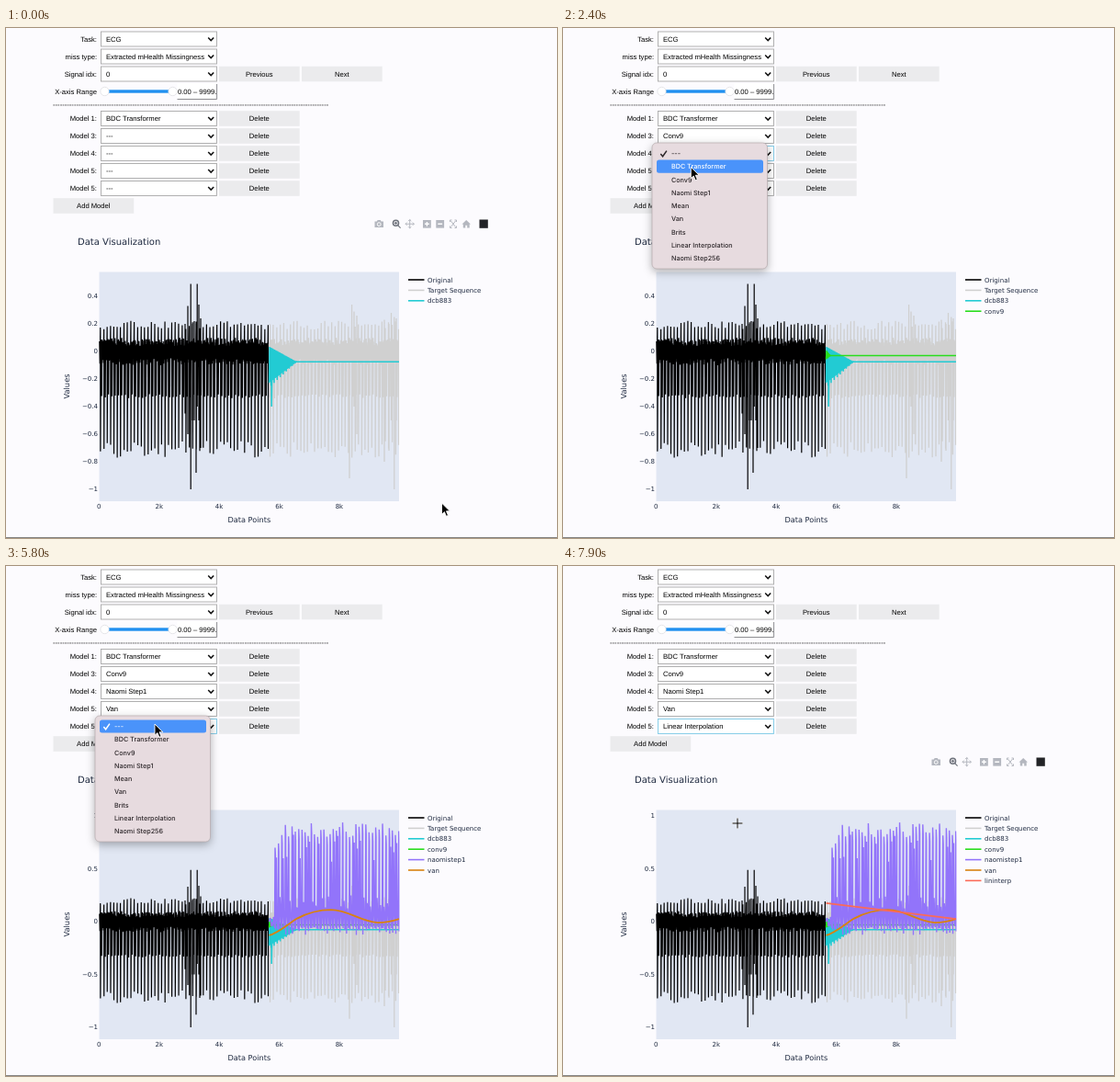
An HTML page that plays this animation: 600x555 px, repeating every 8000 ms.

```html
<!DOCTYPE html>
<html lang="en">
<head>
<meta charset="utf-8">
<title>Data Visualization</title>
<style>
  html, body { margin: 0; width: 100%; height: 100%; overflow: hidden; background: #fcfbfe; }
  svg { display: block; width: 600px; height: 555px; }
  text { white-space: pre; text-rendering: geometricPrecision; }
  .ui { font: 7.65px "Liberation Sans", Arial, sans-serif; fill: #000; }
  .plot { font-family: "DejaVu Sans", Verdana, sans-serif; font-size: 7px; fill: #1f2a40; }
  .menu { font: 500 7.2px Inter, "Liberation Sans", sans-serif; fill: #2c2629; }
  .trace { fill: none; stroke-linejoin: bevel; vector-effect: non-scaling-stroke; }
</style>
</head>
<body>
<script>
const NS = 'http://www.w3.org/2000/svg';
const LOOP = 8000, STEP = 100;
const PLOT = { x: 101.5, y: 265.5, w: 326.5, h: 249.5 };
const SPLIT = 286.5;
const ROW_H = 14.22;
const OPTIONS = ['---', 'BDC Transformer', 'Conv9', 'Naomi Step1', 'Mean', 'Van', 'Brits',
  'Linear Interpolation', 'Naomi Step256'];

// y of the row, chosen option, time the list opens, time of the pick
const PICKS = [
  { y: 117.5, option: 2, open: 800, pick: 1300 },
  { y: 136.5, option: 3, open: 2200, pick: 2800 },
  { y: 155.5, option: 5, open: 4000, pick: 4800 },
  { y: 174.5, option: 7, open: 5700, pick: 6900 }
];
// from, to, number of model traces
const CHARTS = [[0, 1400, 1], [1800, 2900, 2], [3400, 5000, 3], [5500, 7400, 4], [7700, 8000, 5]];
// time, x, y of the pointer
const POINTER = [
  [0, 474.5, 517], [100, 474.5, 517], [700, 150, 116], [900, 146, 117], [1200, 137, 145],
  [1400, 137, 145], [1600, 137, 141], [1900, 138, 136], [2200, 140, 137], [2700, 138, 178],
  [3100, 138, 177], [3600, 146, 157], [4100, 146, 156], [4600, 136, 224], [4900, 136, 226],
  [5400, 160, 174], [5800, 162, 172], [6100, 145, 215], [6500, 137, 284], [6800, 139, 274],
  [7200, 140, 274], [7900, 190, 280], [8000, 190, 280]
];

function el(parent, tag, attrs = {}, text) {
  const node = document.createElementNS(NS, tag);
  for (const k in attrs) node.setAttribute(k, attrs[k]);
  if (text !== undefined) node.textContent = text;
  parent.appendChild(node);
  return node;
}
const show = (node, on) => node.setAttribute('visibility', on ? 'visible' : 'hidden');
const rect = (p, x, y, width, height, fill, more) => el(p, 'rect', { x, y, width, height, fill, ...more });
const path = (p, d, stroke, width, more) =>
  el(p, 'path', { d, fill: 'none', stroke, 'stroke-width': width, ...more });
const label = (p, x, y, str, anchor = 'start', more) =>
  el(p, 'text', { x, y, 'text-anchor': anchor, ...more }, str);

function random(seed) {
  return () => {
    seed = (seed + 0x6D2B79F5) | 0;
    let t = Math.imul(seed ^ (seed >>> 15), 1 | seed);
    t = (t + Math.imul(t ^ (t >>> 7), 61 | t)) ^ t;
    return ((t ^ (t >>> 14)) >>> 0) / 4294967296;
  };
}

const svg = el(document.body, 'svg', { viewBox: '0 0 600 555' });

// ---------- form ----------
const form = el(svg, 'g', { class: 'ui' });

function select(y, name, value) {
  label(form, 99, y + 2.8, name, 'end');
  const box = rect(form, 103.5, y - 8, 126, 16, '#fff', { stroke: '#a8a8a8', 'stroke-width': 0.9 });
  const text = label(form, 109, y + 2.8, value);
  path(form, `M220.2 ${y - 1.6}l3 3.2l3 -3.2`, '#111', 1.5);
  return { box, text };
}
function button(x, y, name) {
  rect(form, x, y - 8.3, 87.7, 16.6, '#ebebed');
  label(form, x + 43.8, y + 2.8, name, 'middle');
}

select(12, 'Task:', 'ECG');
select(31, 'miss type:', 'Extracted mHealth Missingness');
select(50, 'Signal idx:', '0');
button(232, 50, 'Previous');
button(322, 50, 'Next');

label(form, 99, 71.8, 'X-axis Range', 'end');
rect(form, 107, 67.3, 75, 3.4, '#2090f0');
for (const cx of [107.5, 181.5])
  el(form, 'circle', { cx, cy: 69, r: 4.7, fill: '#fff', stroke: '#dcdce0', 'stroke-width': 0.7 });
rect(form, 186.5, 60.5, 43.3, 17, '#fff');
path(form, 'M186.5 77.5H229.6V61', '#8e8e92', 1);
label(form, 187, 71.8, '0.00 – 9999.');
label(form, 51, 86, '-'.repeat(118));

select(98.5, 'Model 1:', 'BDC Transformer');
const selects = PICKS.map((p, i) => select(p.y, `Model ${['3', '4', '5', '5'][i]}:`, '---'));
[98.5, ...PICKS.map(p => p.y)].forEach(y => button(232, y, 'Delete'));
button(51.5, 193.5, 'Add Model');
rect(svg, 0, 554, 600, 1, '#858585');

// ---------- chart ----------
const chart = el(svg, 'g', { class: 'plot' });
label(chart, 78, 236, 'Data Visualization', 'start', { style: 'font-size:10px' });
label(chart, 264.8, 538.3, 'Data Points', 'middle', { style: 'font-size:8.2px' });
label(chart, 0, 0, 'Values', 'middle',
  { style: 'font-size:8.3px', transform: 'translate(69 390) rotate(-90)' });
['0', '2k', '4k', '6k', '8k'].forEach((s, i) => label(chart, 101.3 + i * 65.4, 522.7, s, 'middle'));
rect(chart, PLOT.x, PLOT.y, PLOT.w, PLOT.h, '#e1e7f3');

function scale(zero, unit, values) {
  const group = el(chart, 'g');
  values.forEach(v => label(group, 100, zero - v * unit + 2.4, String(v).replace('-', '−'), 'end'));
  return { group, transform: `translate(0 ${zero}) scale(1 ${-unit})` };
}
const narrow = scale(352, 150, [0.4, 0.2, 0, -0.2, -0.4, -0.6, -0.8, -1]);
const wide = scale(387, 115, [1, 0.5, 0, -0.5, -1]);

const toPath = pts => 'M' + pts.map(([x, y]) => `${x.toFixed(2)} ${y.toFixed(3)}`).join('L');

// Heartbeats: a dense band, one tall spike and one half-depth dip per period
function beats(x0, x1, seed, bursts) {
  const rnd = random(seed), pts = [], period = 3.75;
  for (let x = x0; x < x1; x += period + (rnd() - 0.5) * 0.5) {
    for (let i = 0; i < 8; i++) {
      const px = Math.min(x + i * 0.47, x1);
      if (i === 2) pts.push([px, 0.16 + rnd() * 0.065], [px + 0.1, -0.65 - rnd() * 0.12]);
      else if (i === 5) pts.push([px, 0.05 + rnd() * 0.05], [px + 0.1, -0.31 - rnd() * 0.03]);
      else pts.push([px, i % 2 ? -0.05 - rnd() * 0.05 : 0.04 + rnd() * 0.05]);
    }
  }
  return toPath(pts) + bursts.map(([x, hi, lo]) => `M${x} ${hi}L${x} ${lo}`).join('');
}

// Damped ringing that settles on a level
function ringing(length, top, bottom, level) {
  const pts = [];
  for (let x = 0, i = 0; x < length; x += 0.55, i++) {
    const k = 1 - x / length;
    pts.push([SPLIT + x, level + (i % 2 ? top : -bottom * (i % 6 === 4 ? 1.1 : 0.9)) * k]);
  }
  pts.push([SPLIT + length, level], [428, level]);
  return toPath(pts);
}

function tallSpikes() {
  const rnd = random(31), pts = [[SPLIT, 0]];
  for (let x = SPLIT + 0.5; x < 292; x += 0.6) pts.push([x, (rnd() - 0.5) * 0.1]);
  for (let x = 292.5, n = 0; x < 428; x += 3.55 + (rnd() - 0.5) * 0.6, n++) {
    const peak = n === 0 ? 0.7 : n < 3 ? 0.66 + n * 0.08 : 0.8 + rnd() * 0.14;
    for (let i = 0; i < 7; i++) {
      const px = Math.min(x + i * 0.5, 428);
      if (i === 1) pts.push([px, peak], [px + 0.4, peak * 0.9], [px + 0.5, -0.05 - rnd() * 0.08]);
      else if (i === 4) pts.push([px, rnd() < 0.45 ? (0.65 + rnd() * 0.3) * peak : 0.12 + rnd() * 0.14]);
      else pts.push([px, i % 2 ? 0.06 + rnd() * 0.07 : -0.02 - rnd() * 0.06]);
    }
  }
  return toPath(pts);
}

const VAN = `M${SPLIT} -.13C296 -.11 306 -.03 317 .03C330 .09 340 .112 354 .112` +
  'C374 .108 384 .005 405 -.01C414 -.01 422 .008 428 .025';

// name, colour, width, curve
const TRACES = [
  ['Original', '#000', 1.2, beats(101.8, SPLIT - 1, 5, [
    [195, 0.2, -0.45], [198, 0.33, -0.6], [201.2, 0.49, -1], [203, 0.2, -0.5], [205, 0.22, -0.5],
    [207, 0.2, -0.88], [208.2, 0.49, -0.4], [210, 0.34, -0.5], [212, 0.24, -0.7]])],
  ['Target Sequence', '#d0d0d0', 1.3, beats(SPLIT, 427.5, 12, [
    [374, 0.1, -0.92], [376.6, 0.34, -0.5], [379, 0.29, -0.4], [382, 0.26, -0.6],
    [412, 0.23, -0.8], [417, 0.2, -0.72], [419.5, 0.28, -0.5], [422.8, 0.25, -1], [425, 0.24, -0.5]])],
  ['dcb883', '#22cbd3', 1.5, ringing(30, 0.11, 0.17, -0.075) + 'M289 -.05L289.2 -.4L290 -.05'],
  ['conv9', '#29dd1d', 1.5, ringing(5, 0.04, 0.03, -0.03)],
  ['naomistep1', '#9274fa', 1.4, tallSpikes()],
  ['van', '#d9820f', 1.9, VAN],
  ['lininterp', '#fb6a58', 1.9, `M${SPLIT} .175L428 .025`]
];

const clip = el(el(svg, 'defs'), 'clipPath', { id: 'area' });
rect(clip, PLOT.x - 0.5, PLOT.y, PLOT.w + 1, PLOT.h, '#000');
const clipped = el(chart, 'g', { 'clip-path': 'url(#area)' });
const signals = el(clipped, 'g');
const traces = TRACES.map(([name, colour, width, d], i) => {
  const y = 274 + i * 11.4;
  const key = el(chart, 'g');
  path(key, `M438 ${y}H455.5`, colour, 1.6);
  label(key, 459, y + 2.6, name);
  return [key, path(signals, d, colour, width, { class: 'trace' })];
});

// ---------- chart tools ----------
const tools = el(svg, 'g');
const GREY = '#b4b7bf';
path(tools, 'M401.5 210.5h2.2l1 -1.5h3l1 1.5h2.3v6.5h-9.5z', 'none', 0, { style: `fill:${GREY}` });
el(tools, 'circle', { cx: 406.2, cy: 213.6, r: 1.9, fill: GREY, stroke: '#fff', 'stroke-width': 1 });
el(tools, 'circle', { cx: 424.5, cy: 212.3, r: 3, fill: 'none', stroke: '#6f737c', 'stroke-width': 1.6 });
path(tools, 'M426.6 214.6l3 3M423 212.3h3M424.5 210.8v3', '#6f737c', 1.2);
path(tools, 'M435 213.2h9.4M439.7 208.5v9.4M436.6 211.6l-1.6 1.6l1.6 1.6M442.8 211.6l1.6 1.6l-1.6 1.6' +
  'M438.1 210.1l1.6 -1.6l1.6 1.6M438.1 216.3l1.6 1.6l1.6 -1.6', GREY, 1);
for (const x of [454, 468.3]) rect(tools, x, 209, 8.8, 8.6, GREY);
path(tools, 'M456 213.3h4.8M458.4 210.9v4.8M470.3 213.3h4.8', '#fff', 1.4);
path(tools, 'M483.5 211v-2h2M488.5 209h2v2M490.5 215.5v2h-2M485.5 217.5h-2v-2M484.5 210l5 6.5M489.5 210l-5 6.5',
  GREY, 1);
path(tools, 'M496.5 213.6L501.2 209L506 213.6H504.7V217.4H502.2V214.8H500.3V217.4H497.8V213.6Z',
  'none', 0, { style: `fill:${GREY}` });
rect(tools, 515.5, 208.5, 9.3, 9.3, '#222326');

// ---------- option list ----------
const menu = el(svg, 'g', { class: 'menu' });
menu.style.filter = 'drop-shadow(0 3px 5px rgba(0,0,0,.3))';
rect(menu, 97, -11.5, 125.5, 137, '#e7dbdf', { rx: 5, stroke: '#b5a9ad', 'stroke-width': 0.7 });
const bar = rect(menu, 102, 0, 116, 14.2, '#4a93fa', { rx: 2.5 });
const check = path(menu, 'M106.3 .6l2.3 2.7l4.3 -6.2', '#2c2629', 1.5);
const items = OPTIONS.map((s, i) => label(menu, 118, i * ROW_H + 2.7, s));

// ---------- pointer ----------
const arrow = el(svg, 'path', {
  d: 'M0 0V12.3L2.9 9.6L4.9 14.3L7 13.4L5 8.8H8.9Z',
  fill: '#000', stroke: '#fff', 'stroke-width': 0.9
});
const cross = el(svg, 'g');
path(cross, 'M-6 0H6M0 -6V6', '#fff', 2.2);
path(cross, 'M-5.5 0H5.5M0 -5.5V5.5', '#000', 1);

function pointerAt(t) {
  const i = Math.max(1, POINTER.findIndex(p => p[0] > t));
  const [t0, x0, y0] = POINTER[i - 1], [t1, x1, y1] = POINTER[i];
  const u = (t - t0) / (t1 - t0), k = u * u * (3 - 2 * u);
  return [x0 + (x1 - x0) * k, y0 + (y1 - y0) * k];
}

function render(t) {
  const [x, y] = pointerAt(t);
  const opened = PICKS.find(p => t >= p.open && t < p.pick);
  const focus = PICKS.filter(p => t >= p.open).pop();

  selects.forEach(({ box, text }, i) => {
    const p = PICKS[i];
    text.textContent = OPTIONS[t >= p.pick ? p.option : 0];
    box.setAttribute('stroke', p === focus ? '#7cc8e6' : '#a8a8a8');
  });

  const state = CHARTS.find(c => t >= c[0] && t < c[1]);
  chart.style.display = state ? '' : 'none';
  if (state) {
    const axis = state[2] > 2 ? wide : narrow;
    for (const s of [narrow, wide]) s.group.style.display = s === axis ? '' : 'none';
    signals.setAttribute('transform', axis.transform);
    traces.forEach((pair, i) => pair.forEach(node => show(node, i < state[2] + 2)));
  }
  show(tools, state && !opened && y > 203 && (t < 800 || t >= 7400));

  menu.style.display = opened ? '' : 'none';
  if (opened) {
    const hover = Math.max(0, Math.min(8, Math.round((y + 1 - opened.y) / ROW_H)));
    menu.setAttribute('transform', `translate(0 ${opened.y})`);
    bar.setAttribute('y', hover * ROW_H - 7.1);
    items.forEach((node, i) => { node.style.fill = i === hover ? '#fff' : ''; });
    check.setAttribute('stroke', hover === 0 ? '#fff' : '#2c2629');
  }

  const inPlot = state && !opened && x > PLOT.x && x < PLOT.x + PLOT.w && y > PLOT.y && y < PLOT.y + PLOT.h;
  show(cross, inPlot);
  show(arrow, !inPlot);
  for (const node of [arrow, cross]) node.setAttribute('transform', `translate(${x} ${y})`);
}

const start = performance.now();
function frame() {
  const t = (performance.now() - start) % LOOP;
  render(Math.floor(t / STEP) * STEP);
  requestAnimationFrame(frame);
}
render(0);
requestAnimationFrame(frame);
</script>
</body>
</html>
```
